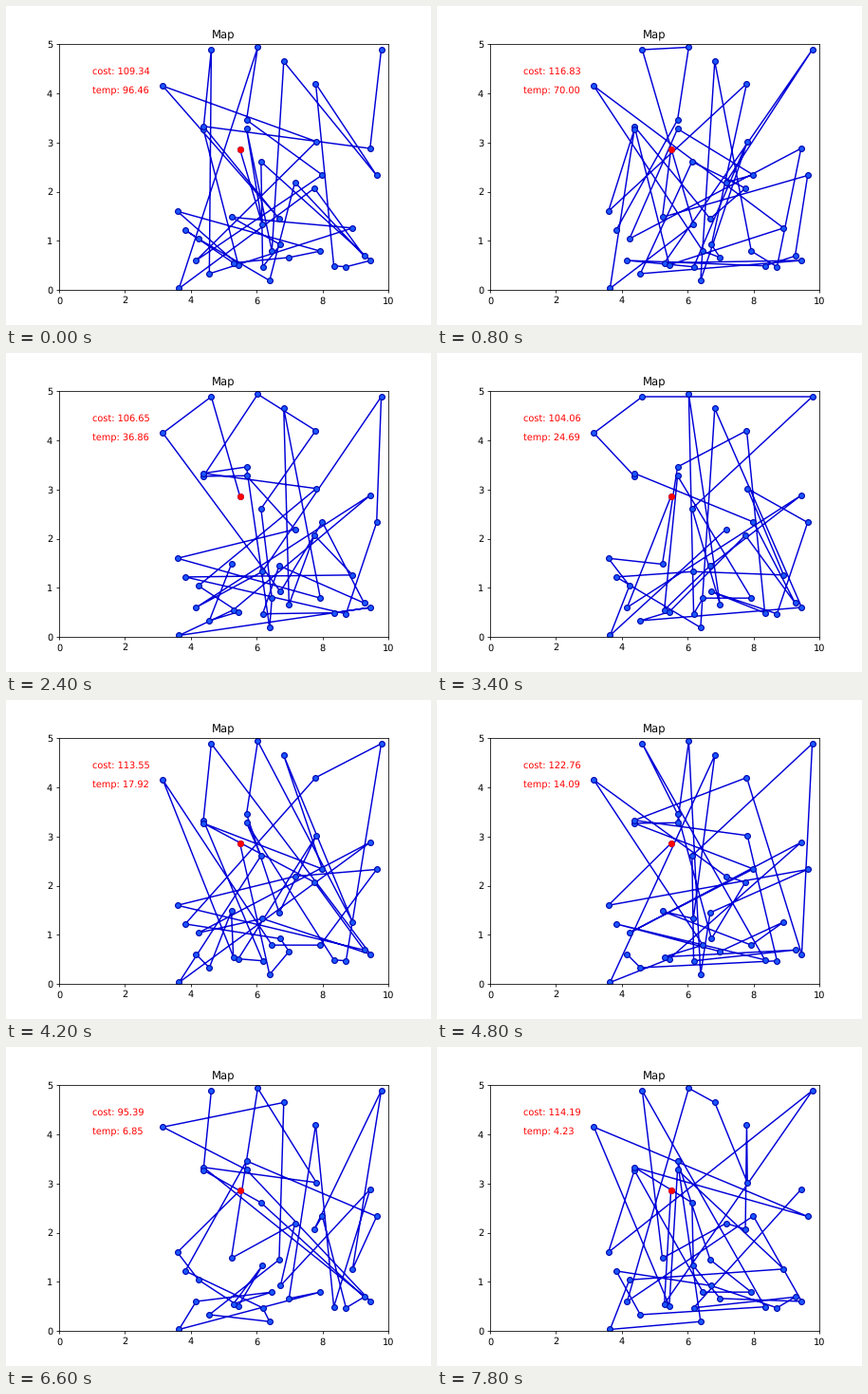
These frames come from a looping animation (448 px wide and 336 px high, 8 s). A matplotlib script:

```python
import math
import random

import matplotlib.pyplot as plt
from matplotlib.animation import FuncAnimation

FRAMES, INTERVAL = 40, 200
SWAPS = 20          # annealing steps between two drawn tours
COOLING = 0.996
BLUE = "#0000d8"

# The tour always starts at the first city.
CITIES = [
    (5.49, 2.86), (3.15, 4.15), (4.62, 4.89), (6.03, 4.94), (6.82, 4.65),
    (7.79, 4.20), (9.78, 4.89), (4.38, 3.33), (4.38, 3.27), (5.69, 3.46),
    (5.69, 3.28), (7.81, 3.02), (9.44, 2.88), (9.64, 2.33), (7.99, 2.34),
    (7.16, 2.19), (7.75, 2.07), (6.13, 2.61), (3.59, 1.60), (5.23, 1.48),
    (6.68, 1.45), (6.17, 1.33), (8.91, 1.26), (3.83, 1.22), (4.23, 1.04),
    (6.72, 0.92), (6.46, 0.79), (7.93, 0.79), (6.98, 0.66), (9.26, 0.69),
    (9.46, 0.60), (4.16, 0.60), (5.29, 0.55), (5.44, 0.51), (6.18, 0.47),
    (8.34, 0.49), (8.71, 0.47), (4.56, 0.33), (6.39, 0.19), (3.64, 0.03),
]


def temperature(step):
    return 100 * COOLING ** step


def length(tour):
    return sum(math.dist(a, b) for a, b in zip(tour, tour[1:]))


def swap(tour, temp, rng):
    """Swap two cities; keep a longer tour only with Boltzmann probability."""
    i, j = rng.sample(range(1, len(tour)), 2)
    new = tour[:]
    new[i], new[j] = new[j], new[i]
    rise = length(new) - length(tour)
    return new if rise < 0 or rng.random() < math.exp(-rise / temp) else tour


def anneal(seed):
    """One (tour, temperature) pair for each drawn frame."""
    rng = random.Random(seed)
    tour = CITIES[:1] + rng.sample(CITIES[1:], len(CITIES) - 1)
    states = []
    for step in range(SWAPS * FRAMES):
        temp = temperature(step)
        tour = swap(tour, temp, rng)
        if step % SWAPS == 9:
            states.append((tour, temp))
    return states


states = anneal(seed=7)

plt.rcParams["text.hinting"] = "none"
fig, ax = plt.subplots(figsize=(6.4, 4.8), dpi=70)
ax.set(xlim=(0, 10), ylim=(0, 5), title="Map")
route, = ax.plot([], [], "o-", color=BLUE, markerfacecolor="#1a58ff",
                 markeredgecolor="#0008b0", markeredgewidth=1.2)
ax.plot(*CITIES[0], "ro", zorder=3)
cost_text = ax.text(1, 4.4, "", color="r")
temp_text = ax.text(1, 4.0, "", color="r")


def draw(frame):
    tour, temp = states[frame]
    route.set_data(*zip(*tour))
    cost_text.set_text(f"cost: {length(tour):.2f}")
    temp_text.set_text(f"temp: {temp:.2f}")
    return route, cost_text, temp_text


anim = FuncAnimation(fig, draw, frames=FRAMES, interval=INTERVAL,
                     init_func=lambda: draw(0), repeat=True, repeat_delay=0)
plt.show()
```
